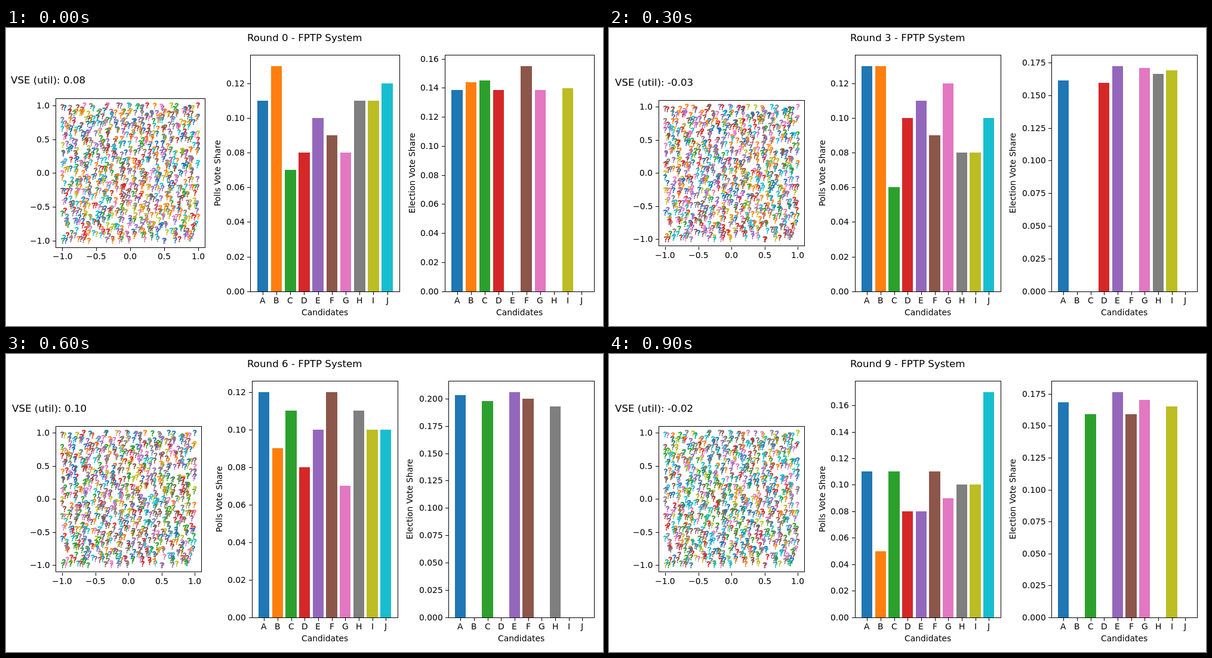
Animation of 1000 by 500 pixels, one loop 1 s. Source, as an HTML page with a canvas:

```html
<!DOCTYPE html>
<html lang="en">
<head>
<meta charset="utf-8">
<title>Voting rounds</title>
<style>
  html, body { margin: 0; width: 100%; height: 100%; overflow: hidden; background: #fff; }
  canvas { display: block; }
</style>
</head>
<body>
<canvas id="stage" width="1000" height="500"></canvas>
<script>
const ctx = document.getElementById('stage').getContext('2d');
const COLORS = ['#1f77b4', '#ff7f0e', '#2ca02c', '#d62728', '#9467bd',
                '#8c564b', '#e377c2', '#7f7f7f', '#bcbd22', '#17becf'];
const LETTERS = 'ABCDEFGHIJ';
const TOP = 45, BOTTOM = 441.75, ROUND_MS = 100;

// Utility score, poll percentages for A..J, and the shares of those elected.
const round = (score, polls, votes) => ({
  score,
  polls: polls.map(p => p / 100),
  votes: [...LETTERS].map(c => votes[c] || 0)
});

const rounds = [
  round('0.08', [11, 13, 7, 8, 10, 9, 8, 11, 11, 12],
    { A: .1386, B: .1439, C: .1451, D: .1386, F: .155, G: .1386, I: .1398 }),
  round('0.05', [9, 12, 10, 11, 8, 13, 9, 10, 7, 11],
    { B: .204, D: .198, F: .201, H: .192, J: .205 }),
  round('0.09', [14, 12, 12, 11, 12, 7, 6, 7, 8, 11],
    { B: .2452, C: .2521, E: .2631, H: .2403 }),
  round('-0.03', [13, 13, 6, 10, 11, 9, 12, 8, 8, 10],
    { A: .1613, D: .1595, E: .1723, G: .1709, H: .1661, I: .169 }),
  round('0.06', [10, 12, 9, 11, 13, 8, 11, 9, 10, 7],
    { A: .166, B: .171, D: .161, E: .174, G: .168, I: .16 }),
  round('0.03', [10, 11, 9, 12, 8, 11, 12, 9, 8, 10],
    { D: .2044, F: .2027, G: .2006, H: .1913, I: .2006 }),
  round('0.10', [12, 9, 11, 8, 10, 12, 7, 11, 10, 10],
    { A: .203, C: .198, E: .206, F: .2, H: .193 }),
  round('0.13', [17, 8, 14, 6, 11, 8, 10, 12, 9, 5],
    { B: .3661, I: .3147, J: .3176 }),
  round('0.22', [6, 10, 10, 11, 9, 7, 14, 10, 8, 15],
    { B: .1658, D: .1737, E: .1594, G: .164, H: .1626, I: .1737 }),
  round('-0.02', [11, 5, 11, 8, 8, 11, 9, 10, 10, 17],
    { A: .1685, C: .1591, E: .1764, F: .1591, G: .1703, I: .1652 })
];

function seeded(seed) {
  return () => {
    seed = (seed + 0x6d2b79f5) | 0;
    let t = Math.imul(seed ^ (seed >>> 15), 1 | seed);
    t = (t + Math.imul(t ^ (t >>> 7), 61 | t)) ^ t;
    return ((t ^ (t >>> 14)) >>> 0) / 4294967296;
  };
}

// Voters keep their places; only their colours change between rounds.
const COLS = 30, ROWS = 31;
const place = seeded(11);
const clamp = v => Math.max(-1, Math.min(1, v));
const spread = (cell, count, jitter) =>
  clamp((cell + .5 + (place() - .5) * jitter) / count * 2 - 1);
const voters = Array.from({ length: COLS * ROWS }, (_, i) => ({
  x: spread(i % COLS, COLS, 1.8),
  y: spread(Math.floor(i / COLS), ROWS, 2.6),
  order: place()
})).sort((a, b) => a.order - b.order);

const mark = new Path2D(
  'M-2.2-3.2C-.8-4.4 2.2-4.4 2.1-2.5C2-.9 0-.9-.1 1.2M-.3 3.6L-.3 4');

// Text starts on a whole pixel, whatever its alignment.
function text(str, x, y, align = 'center', size = 13.89) {
  ctx.font = `${size}px "DejaVu Sans", sans-serif`;
  const shift = { left: 0, center: .5, right: 1 }[align];
  ctx.fillStyle = '#000';
  ctx.fillText(str, Math.round(x - ctx.measureText(str).width * shift), y);
}

function line(x1, y1, x2, y2) {
  ctx.beginPath();
  ctx.moveTo(x1, y1);
  ctx.lineTo(x2, y2);
  ctx.stroke();
}

function frame(x, y, w, h) {
  ctx.strokeStyle = '#000';
  ctx.lineWidth = 1;
  ctx.lineCap = 'butt';
  ctx.strokeRect(Math.round(x) + .5, Math.round(y) + .5, Math.round(w), Math.round(h));
}

function xTick(label, x, y) {
  const px = Math.round(x) + .5, py = Math.round(y);
  line(px, py + 1, px, py + 6);
  text(label, x, py + 20);
}

function yTick(label, x, y) {
  const px = Math.round(x), py = Math.round(y) + .5;
  line(px - 5, py, px, py);
  text(label, x - 9.7, Math.round(y + 5), 'right');
}

function tickStep(range) {
  const unit = 10 ** Math.floor(Math.log10(range / 9));
  return [1, 2, 2.5, 5, 10].map(m => m * unit).find(s => range / s <= 9);
}

const axisMax = values => Math.max(...values) * 1.05;
const decimals = step => Math.abs(step - .025) < 1e-6 ? 3 : 2;

function barChart(values, x, w, label, labelX) {
  const max = axisMax(values), step = tickStep(max), unit = w / 10.78;
  const yOf = v => BOTTOM - v / max * (BOTTOM - TOP);
  const center = i => x + (i + .89) * unit;
  const base = Math.round(BOTTOM);

  values.forEach((v, i) => {
    if (!v) return;
    const left = Math.round(center(i) - .4 * unit);
    const right = Math.round(center(i) + .4 * unit);
    const top = Math.round(yOf(v));
    ctx.fillStyle = COLORS[i];
    ctx.fillRect(left, top, right - left, base - top);
  });

  frame(x, TOP, w, BOTTOM - TOP);
  values.forEach((_, i) => xTick(LETTERS[i], center(i), BOTTOM));
  for (let k = 0; k * step <= max; k++) {
    yTick((k * step).toFixed(decimals(step)), x, yOf(k * step));
  }
  text('Candidates', x + w / 2, 482);
  ctx.save();
  ctx.translate(labelX, 243);
  ctx.rotate(-Math.PI / 2);
  text(label, 0, 0);
  ctx.restore();
}

function scatter(polls, index, y, size) {
  const x = 83, scale = size / 2.2;
  const cx = x + size / 2, cy = y + size / 2;
  const random = seeded(101 + index * 37);
  const total = polls.reduce((a, b) => a + b);

  ctx.lineWidth = 2;
  ctx.lineCap = 'round';
  for (const v of voters) {
    let pick = random() * total, c = 0;
    while (c < 9 && (pick -= polls[c]) > 0) c++;
    ctx.strokeStyle = COLORS[c];
    ctx.save();
    ctx.translate(cx + v.x * scale, cy + v.y * scale);
    ctx.stroke(mark);
    ctx.restore();
  }

  frame(x, y, size, size);
  for (let k = -2; k <= 2; k++) {
    const label = (k / 2).toFixed(1).replace('-', '\u2212');
    xTick(label, cx + k / 2 * scale, y + size);
    yTick(label, x, cy - k / 2 * scale);
  }
}

function draw(index) {
  const { score, polls, votes } = rounds[index];
  // Three-decimal labels take more room, so every panel shrinks.
  const narrow = decimals(tickStep(axisMax(votes))) === 3;
  const w = narrow ? 244.4 : 250;

  ctx.fillStyle = '#fff';
  ctx.fillRect(0, 0, 1000, 500);
  scatter(polls, index, narrow ? 121.2 : 118.4, w);
  barChart(polls, narrow ? 412 : 409.25, w, 'Polls Vote Share', narrow ? 362 : 359);
  barChart(votes, narrow ? 741 : 735, w, 'Election Vote Share', narrow ? 681 : 685);
  text(`Round ${index} - FPTP System`, 500, 22, 'center', 16.67);
  text(`VSE (util): ${score}`, narrow ? 9.7 : 8, narrow ? 97 : 93, 'left', 16.67);
}

let shown = -1;
function tick() {
  const index = Math.floor(performance.now() / ROUND_MS) % rounds.length;
  if (index !== shown) draw(shown = index);
  requestAnimationFrame(tick);
}
tick();
</script>
</body>
</html>
```
